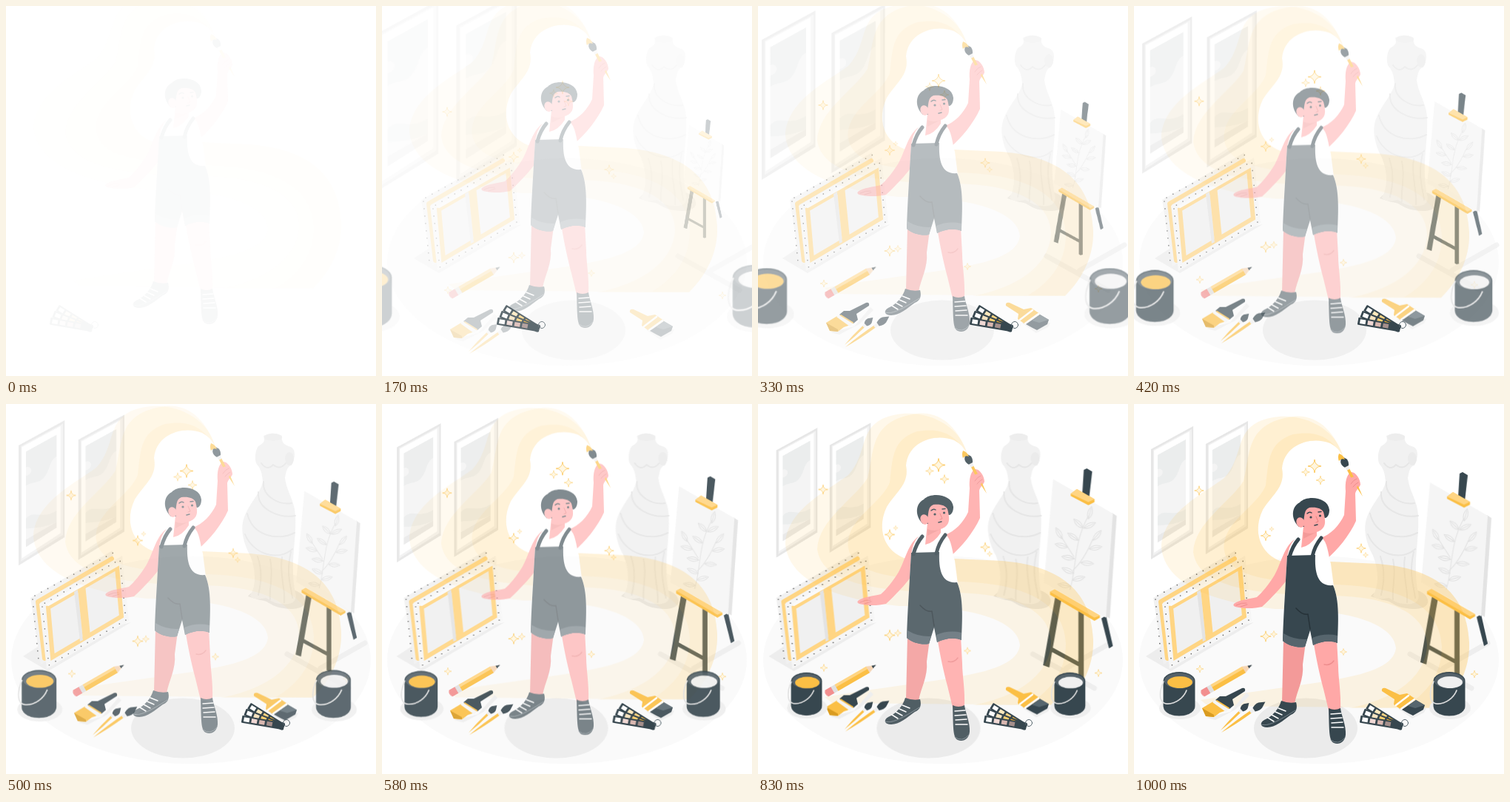
Animation of 500 by 500 pixels, one loop 1.04 s. Source, as an HTML page:

```html
<!DOCTYPE html>
<html lang="en">
<head>
<meta charset="utf-8">
<title>Painter's studio</title>
<style>
html, body { margin: 0; width: 100%; height: 100%; overflow: hidden; background: #fff; }
svg { display: block; width: 100%; height: 100%; }

/* 25 frames of 4% each, stepped between poses */
.rise, .fade, .slide, .lift, .shrink, .grow, .deal, .deepen {
  animation: 1040ms steps(4) -4ms infinite both;
}
.rise { animation-name: rise; }
.deepen { animation-name: deepen; animation-timing-function: steps(24); }
.fade { animation-name: fade; }
.slide { animation-name: fade, slide; }
.lift { animation-name: fade, lift; }
.shrink { animation-name: fade, shrink; }
.grow { animation-name: fade, grow; transform-origin: 435px 234px; }
.deal { animation-name: show, deal; }
.wall { transform-origin: 89px 118px; }
.pots { transform-origin: 243.5px 391px; }

@keyframes rise {
  0%, 4% { opacity: .04; transform: translateY(-29px); animation-timing-function: steps(3); }
  16% { opacity: .27; transform: translateY(-24px); }
  32% { opacity: .45; transform: translateY(-19px); }
  48% { opacity: .56; transform: translateY(-14px); }
  64% { opacity: .7; transform: translateY(-9px); }
  80% { opacity: .86; transform: translateY(-4px); }
  96%, 100% { opacity: 1; transform: none; }
}
@keyframes deepen {
  0% { opacity: .7; }
  96%, 100% { opacity: 1; }
}
@keyframes fade {
  0%, 4% { opacity: 0; animation-timing-function: steps(3); }
  16% { opacity: .25; } 32% { opacity: .53; } 48% { opacity: .8; }
  64%, 100% { opacity: 1; }
}
@keyframes show {
  0%, 4% { opacity: .04; animation-timing-function: steps(3); }
  16% { opacity: .8; } 32%, 100% { opacity: 1; }
}
@keyframes slide {
  0%, 4% { transform: translateX(34px); animation-timing-function: steps(3); }
  16% { transform: translateX(27px); }
  32% { transform: translateX(17px); }
  48% { transform: translateX(7px); }
  64% { transform: none; }
  80% { transform: translateX(-1.5px); }
  96%, 100% { transform: none; }
}
@keyframes lift {
  0%, 4% { transform: translateY(34px); animation-timing-function: steps(3); }
  16% { transform: translateY(26px); }
  32% { transform: translateY(17px); }
  48% { transform: translateY(6.5px); }
  64% { transform: none; }
  80% { transform: translateY(-1.5px); }
  96%, 100% { transform: none; }
}
@keyframes shrink {
  0%, 4% { transform: scale(1.55); animation-timing-function: steps(3); }
  16% { transform: scale(1.43); }
  32% { transform: scale(1.27); }
  48% { transform: scale(1.09); }
  64% { transform: none; }
  80% { transform: scale(.975); }
  96%, 100% { transform: none; }
}
@keyframes grow {
  0%, 4% { transform: scale(.45); animation-timing-function: steps(3); }
  16% { transform: scale(.57); }
  32% { transform: scale(.735); }
  48% { transform: scale(.91); }
  64% { transform: scale(1.01); }
  80% { transform: scale(1.035); }
  96%, 100% { transform: none; }
}
@keyframes deal {
  0%, 4% { transform: translateX(-246px); animation-timing-function: steps(3); }
  16% { transform: translateX(-150px); }
  32% { transform: translateX(-19px); }
  48% { transform: translateX(13px); }
  64%, 100% { transform: none; }
}
.ink { fill: #37474f; }
.gold { fill: #fbbf45; }
.skin { fill: #ffa8a7; }
.line { fill: none; stroke-linecap: round; stroke-linejoin: round; }
.dots { fill: none; stroke: #666; stroke-width: 1.7; stroke-linecap: round; stroke-dasharray: 0 10; }
.stars { fill: #fff6e0; stroke: #fbbf45; stroke-width: .8; }
</style>
</head>
<body>
<svg viewBox="0 0 500 500">
<defs>
  <path id="star" d="M0-9Q.6-.6 9 0Q.6.6 0 9Q-.6.6-9 0Q-.6-.6 0-9Z"/>
  <g id="brush">
    <path class="gold" d="M0 0Q20-2.400 42-1.900V1.900Q20 2.400 0 0Z"/>
    <path fill="#eee" d="M41-2L47-3V3L41 2Z"/>
    <path class="ink" d="M46-3Q51-6 55-4.500L62 0L55 4.500Q51 6 46 3Z"/>
  </g>
  <g id="picture">
    <path fill="#e6e6e6" d="M23 61L80 30V175L23 210Z"/>
    <path fill="#f2f2f2" d="M26 62L78 34V172L26 205Z"/>
    <path fill="#fff" d="M27 63L75 37V170L27 201Z"/>
    <path fill="#f4f4f4" d="M32 69L70 48V163L32 187Z"/>
    <path fill="#ebeded" d="M32 69L70 48V75C61 79 62 92 55 100C48 109 41 105 32 111V99C42 97 40 85 32 88Z"/>
    <path fill="#ebeded" d="M32 152C42 140 52 154 70 142V156C56 162 48 163 32 164Z"/>
    <path fill="#e9e9e9" d="M32 178L70 156V163L32 187Z"/>
  </g>
  <g id="pot">
    <ellipse cx="62" cy="411" rx="28" ry="15" fill="#eee"/>
    <path class="ink" d="M39.500 374V408C40 426 82 426 82.500 408V374Z"/>
    <ellipse class="ink" cx="61" cy="374" rx="21.500" ry="12"/>
    <ellipse cx="61" cy="374" rx="20" ry="10.500" fill="#546169"/>
  </g>
  <path id="bail" class="line" stroke="#e0e0e0" stroke-width="1.600" d="M40 375C33 390 34 404 44 405C56 406 67 397 71 387"/>
  <path id="leaf" d="M0 0Q-6-8 0-17Q6-8 0 0V-14"/>
  <g id="card">
    <rect class="ink" x="-57" y="-5.200" width="61" height="10.400" rx="1"/>
    <path fill="#fff" d="M-54-3h8v6h-8z"/>
  </g>
  <path id="bib" d="M207 205L245 204C244 228 248 247 269 245C278 265 276 295 275 323C265 319 252 321 242 326L238 306L231 328C222 330 209 327 201 320C202 285 204 260 205 238Z"/>
</defs>

<ellipse class="fade" cx="250" cy="346" rx="243" ry="140.500" fill="#fafafa"/>

<g class="shrink wall">
  <use href="#picture"/>
  <use href="#picture" x="74" y="-7"/>
</g>

<g class="slide">
  <path class="line" stroke="#eee" stroke-width="7" stroke-linecap="butt" d="M373 338L456 384M418 357L478 323"/>
  <ellipse cx="232" cy="438" rx="70" ry="40.500" fill="#ebebeb"/>

  <path fill="#ededed" d="M16 341L45 322L162 295L50 361Z"/>
  <path fill="#f1f1f1" d="M26 262L137 198L142 286L40 352Z"/>
  <path class="line" stroke="#ffd583" stroke-width="6" stroke-linejoin="miter" d="M45 344L36 267L136 209"/>
  <path class="dots" d="M29 264L37 346M32 259L138 201"/>
  <path fill="#f6f6f6" d="M38 270L150 205L159 293L48 358Z"/>
  <path fill="#f0f0f0" stroke="#ffd583" stroke-width="6" d="M50 275L143 221L149 287L56 342Z"/>
  <path fill="#e3e3e3" d="M85 254L90 251L97 319L93 321Z"/>
  <path fill="#ffd583" d="M90 250L100 244L107 313L97 319Z"/>
  <path class="line" stroke="#fafafa" stroke-width="4" d="M50 271L146 216"/>
  <path class="dots" d="M42 274L51 353L155 292L147 210L42 271"/>

  <path fill="#e7e7e7" d="M320 260C330 244 390 244 396 262C402 275 385 279 368 276C350 274 350 266 336 265Z"/>
  <path fill="#f1f1f1" d="M341 43Q353 36 366 43C365 52 368 55 378 58C385 62 384 72 379 83C373 84 372 90 370 100C372 118 383 130 384 150C386 185 376 215 384 255C388 268 376 272 366 270C354 270 350 264 344 262C335 264 326 264 323 259C331 245 331 225 323 205C312 185 309 165 316 150C325 130 337 120 340 105C339 95 338 90 334 84C327 78 330 62 334 57C342 52 343 50 341 43Z"/>
  <ellipse cx="354" cy="45" rx="12" ry="5" fill="#ededed"/>
  <ellipse cx="376" cy="74" rx="6" ry="9" fill="#ebebeb"/>
  <path class="line" stroke="#e6e6e6" stroke-width="2" d="M338 80Q346 91 354 82Q363 90 371 80M341 105C339 126 364 137 379 134M334 119C332 142 362 155 384 151M319 148C326 178 360 186 383 174M316 176C326 202 360 214 380 196M333 206C341 230 336 248 334 258M350 210C355 232 348 250 350 264M366 207C362 230 371 250 369 268M378 200C371 230 378 245 380 262"/>
</g>

<g class="grow">
  <path class="ink" d="M463 288L469 284L478 324L473 327Z"/>
  <path fill="#e3e3e3" d="M477 150L483 154L474 288L468 284Z"/>
  <path fill="#f5f5f5" d="M400 106L478 151L469 287L388 241Z"/>
  <g class="line" stroke="#e2e2e2">
    <path d="M422 250C431 222 426 190 446 154M426 225Q440 212 452 184M427 207Q416 190 410 180"/>
    <use href="#leaf" transform="translate(446 158) rotate(15)"/>
    <use href="#leaf" transform="translate(439 170) rotate(-45)"/>
    <use href="#leaf" transform="translate(440 170) rotate(65)"/>
    <use href="#leaf" transform="translate(433 186) rotate(-55)"/>
    <use href="#leaf" transform="translate(452 186) rotate(40)"/>
    <use href="#leaf" transform="translate(447 197) rotate(80)"/>
    <use href="#leaf" transform="translate(412 184) rotate(-30)"/>
    <use href="#leaf" transform="translate(419 195) rotate(-75)"/>
    <use href="#leaf" transform="translate(428 210) rotate(-80)"/>
    <use href="#leaf" transform="translate(436 215) rotate(95)"/>
    <use href="#leaf" transform="translate(427 229) rotate(-65)"/>
    <use href="#leaf" transform="translate(425 238) rotate(75)"/>
    <use href="#leaf" transform="translate(423 246) rotate(-80)"/>
  </g>
  <path class="ink" d="M440 94L444 92L451 96L447 131L438 126Z"/>
  <path class="gold" d="M423 125L431 119L454 132V136L446 140L423 128Z"/>
  <path fill="#ffd583" d="M423 125L431 119L454 132L446 136Z"/>
  <path class="ink" d="M403 258L411 262L395 352L387 349ZM433 276H440V373L436 374L433 372ZM398 325L434 345V351L397 331Z"/>
  <path class="gold" d="M396 253L402 250L461 284V287L454 291L396 257Z"/>
  <path fill="#ffd583" d="M396 253L402 250L461 284L454 287Z"/>
</g>

<g class="lift stars">
  <use href="#star" transform="translate(244 84)"/>
  <use href="#star" transform="translate(232 92) scale(.6)"/>
  <use href="#star" transform="translate(252 103) scale(.65)"/>
  <use href="#star" transform="translate(88 117) scale(.7)"/>
  <use href="#star" transform="translate(178 178) scale(.75)"/>
  <use href="#star" transform="translate(186 169) scale(.35)"/>
  <use href="#star" transform="translate(307 195) scale(.7)"/>
  <use href="#star" transform="translate(313 204) scale(.4)"/>
  <use href="#star" transform="translate(178 314) scale(.8)"/>
  <use href="#star" transform="translate(189 311) scale(.5)"/>
  <use href="#star" transform="translate(283 335) scale(.5)"/>
  <use href="#star" transform="translate(89 358) scale(.55)"/>
  <use href="#star" transform="translate(460 365) scale(.55)"/>
</g>

<g class="rise">
  <!-- ribbon of paint -->
  <g class="gold">
    <path fill-opacity=".13" d="M283 72C272 28 215 4 168 24C136 40 148 72 122 100C92 122 38 148 37 194C42 245 110 268 190 277C300 277 352 300 354 330C348 374 240 374 90 400L100 408L415 411C444 382 454 350 453 322C450 250 400 222 330 216L265 213L200 213C170 203 160 172 174 143C187 122 205 112 200 87C203 54 240 43 265 53Q278 60 283 72Z"/>
    <path fill-opacity=".13" d="M283 72C268 28 240 14 215 17C150 26 158 66 148 104C130 133 82 160 80 200C86 244 150 258 265 259C350 260 395 285 396 325C395 370 350 400 290 411H415C444 382 454 350 453 322C450 250 400 222 330 216L265 213L200 213C170 203 160 172 174 143C187 122 205 112 200 87C203 54 240 43 265 53Q278 60 283 72Z"/>
    <path fill-opacity=".12" d="M283 72C262 36 235 38 215 41C180 52 182 80 178 110C166 140 118 160 122 198C128 234 180 240 270 244C360 246 414 272 416 328C416 370 390 395 365 410H415C444 382 454 350 453 322C450 250 400 222 330 216L265 213L200 213C170 203 160 172 174 143C187 122 205 112 200 87C203 54 240 43 265 53Q278 60 283 72Z"/>
  </g>
  <!-- legs -->
  <path fill="#f39a99" d="M202 318L200 403Q208 410 217 405C220 388 230 372 228 352L232 322Z"/>
  <path class="skin" d="M242 318C246 345 252 370 256 385L263 414Q271 419 279 413C280 390 276 370 276 355L274 318Z"/>
  <path class="line" stroke="#ee8d8d" stroke-width="1.500" d="M257 352Q265 354 270 347"/>
  <!-- shoes -->
  <path class="ink" d="M199 401Q209 405 219 403C221 410 220 417 212 420C201 428 191 437 180 437C171 437 169 431 176 427C187 422 196 412 199 401Z"/>
  <path class="ink" d="M263 411Q271 415 279 411C280 420 287 435 286 447C285 457 277 461 270 458C263 455 264 440 263 411Z"/>
  <path class="line" stroke="#fff" stroke-width="1.500" d="M195 411L205 415M191 416L200 420M186 420L195 425M181 424L189 429M266 419L280 418M266 425L281 424M267 431L282 430M267 437L283 437"/>
  <path class="line" stroke="#78858c" d="M172 433C182 437 202 424 218 414M266 454Q276 462 285 451"/>
  <!-- arms -->
  <path class="skin" d="M217 183C203 192 199 215 190 231C183 243 172 256 166 261C155 264 143 264 135 270Q132 274 142 275C152 277 165 276 173 274C186 262 199 248 208 236L218 212Z"/>
  <path class="line" stroke="#ee8d8d" d="M138 272Q146 268 152 269M144 274L153 271"/>
  <path class="skin" d="M252 181C266 177 278 163 284 150L286 118C285 106 287 96 293 92C299 91 306 101 306 109C304 114 300 116 299 121L300 158C291 178 276 196 259 211Z"/>
  <!-- torso -->
  <path fill="#fff" d="M217 183L253 180C262 187 262 202 266 216L270 247C255 250 240 244 230 230L207 210Q208 192 217 183Z"/>
  <use href="#bib" fill="#fff"/>
  <g class="deepen">
    <use href="#bib" class="ink"/>
    <path fill="#56656d" d="M202 310Q217 319 234 318L231 328C222 330 209 327 201 320ZM241 316Q258 309 275 313V323C265 319 252 321 242 326Z"/>
    <path class="line" stroke="#263238" stroke-width="1.500" d="M219 276Q228 286 235 284L238 304"/>
  </g>
  <path class="line" stroke="#37474f" stroke-width="5" stroke-linecap="butt" d="M210 207Q214 192 222 183M241 206Q244 192 253 181"/>
  <!-- head -->
  <path class="skin" d="M229 165L226 194Q238 192 247 178V168Z"/>
  <path class="ink" d="M223 166C212 156 212 139 224 133C233 123 262 125 264 143C264 151 260 156 256 153L231 166Z"/>
  <path class="skin" d="M229 158C231 152 229 143 237 140C247 139 253 141 256 146C258 154 260 163 255 168C249 175 236 176 230 168Z"/>
  <ellipse class="skin" cx="225" cy="160" rx="5.500" ry="7" transform="rotate(-20 225 160)"/>
  <path fill="#f39a99" d="M229 173Q238 177 247 173L229 182Z"/>
  <circle class="ink" cx="239" cy="153" r="1.600"/>
  <circle class="ink" cx="251.500" cy="151" r="1.600"/>
  <path class="line" stroke="#37474f" stroke-width="1.500" d="M234 148Q237 145 240 147M249 146L253 145.500M244 164L248 163"/>
  <path class="line" stroke="#e77f80" d="M246 152L249 159L246 160"/>
  <!-- raised brush -->
  <use href="#brush" transform="translate(309 125) rotate(-118)"/>
  <path class="gold" d="M277 67Q283 69 285 75Q280 73 277 77Q275 72 277 67Z"/>
  <path class="skin" d="M291 101Q300 94 305 105Q302 116 295 113Z"/>
  <path class="line" stroke="#ee8d8d" d="M293 108Q297 102 301 101M296 112Q300 107 303 106"/>
</g>

<g class="fade" transform="translate(93 391) rotate(-30)">
  <path fill="#f28f8f" d="M0-5H10V5H0Q-4 0 0-5Z"/>
  <path fill="#e0e0e0" d="M9-5h6V5h-6z"/>
  <path class="gold" d="M15-5H64V5H15Z"/>
  <path fill="#ffd583" d="M15-5H64V-1H15Z"/>
  <path fill="#f5d5b5" d="M64-5L76 0L64 5Z"/>
  <path class="ink" d="M71-2L77 0L71 2Z"/>
</g>

<g class="lift">
  <path fill="#eee" d="M98 424L130 416L152 390L156 394L137 413L110 427Z"/>
  <path class="gold" d="M92 411L107 402L125 414L116 417L108 423L97 422Z"/>
  <path fill="#d99b20" d="M92 411L108 420V423L97 422Z"/>
  <path fill="#f5f5f5" d="M106 403L111 399L130 411L124 416Z"/>
  <path class="ink" d="M110 400L116 395H124L146 384Q151 383 150 388L133 399L135 407L129 412Z"/>
  <path class="line" stroke="#fbbf45" stroke-width="2" d="M112 401L128 411"/>

  <path fill="#eee" d="M356 411L395 411L392 417L376 425Z"/>
  <path class="gold" d="M335 388Q334 383 340 384L359 393L369 391L381 399L361 413L351 406L352 399Z"/>
  <path class="line" stroke="#fff" stroke-width="2.500" d="M371 394L354 407M379 399L361 412"/>
  <path class="ink" d="M381 400L393 407L391 413L377 421L371 418L362 413Z"/>
  <path fill="#56666e" d="M381 400L393 407L380 411L370 408Z"/>

  <use href="#brush" transform="translate(117 441) rotate(-44) scale(.86)"/>
  <use href="#brush" transform="translate(118 444) rotate(-35) scale(1.170 .95)"/>
</g>

<g class="shrink pots">
  <use href="#pot"/>
  <ellipse class="gold" cx="62" cy="376" rx="17" ry="8"/>
  <use href="#bail"/>
  <use href="#pot" x="365"/>
  <ellipse cx="427" cy="376" rx="17" ry="8" fill="#f0f0f0"/>
  <use href="#bail" x="365"/>
</g>

<g class="deal">
  <g transform="translate(359 435) rotate(32) scale(.9)">
    <use href="#card"/>
    <path fill="#ffe9bd" d="M-43-3h8v6h-8z"/>
    <path fill="#ffd583" d="M-32-3h8v6h-8z"/>
    <path class="gold" d="M-21-3h8v6h-8z"/>
  </g>
  <g transform="translate(359 435) rotate(21) scale(.92)">
    <use href="#card"/>
    <path fill="#f5e3c0" d="M-43-3h8v6h-8z"/>
    <path fill="#ffd070" d="M-32-3h8v6h-8z"/>
    <path fill="#eaa92e" d="M-21-3h8v6h-8z"/>
  </g>
  <g transform="translate(359 435) rotate(10) scale(.95)">
    <use href="#card"/>
    <path fill="#f0d8d4" d="M-43-3h8v6h-8z"/>
    <path fill="#d9b7b0" d="M-32-3h8v6h-8z"/>
    <path fill="#a58f8c" d="M-21-3h8v6h-8z"/>
  </g>
  <circle class="line" cx="366" cy="431" r="4.500" stroke="#56656d"/>
</g>
</svg>
</body>
</html>
```
